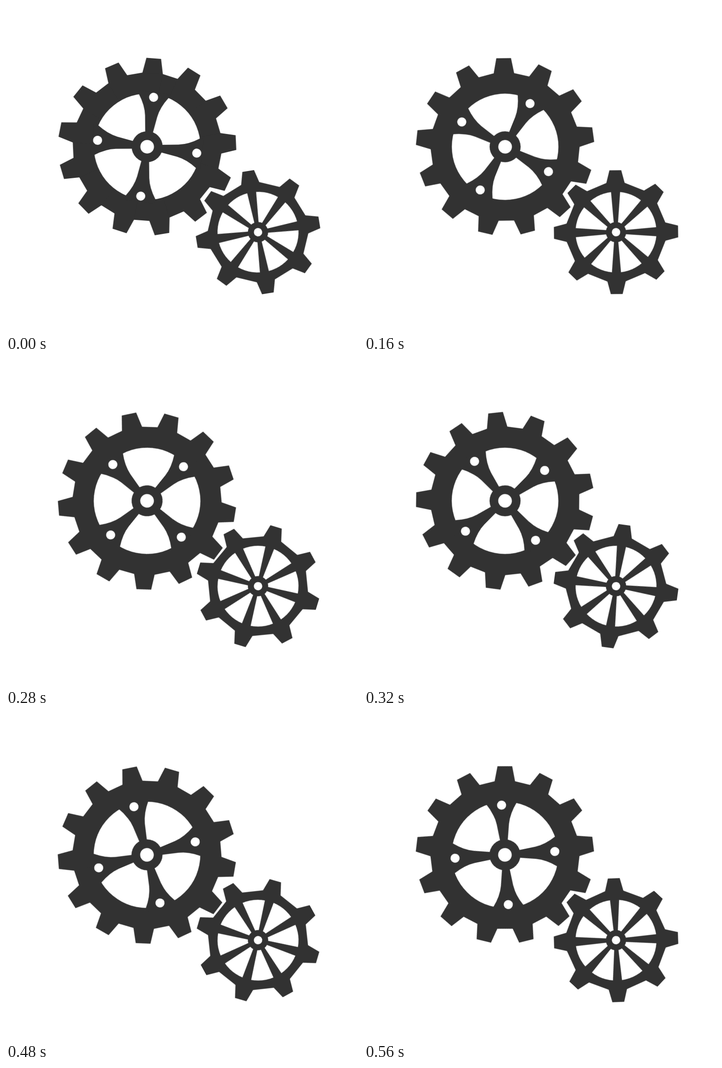
Animation, 776 px wide and 721 px high, one loop 0.6 s. Source, as an HTML page without scripts:

```html
<!DOCTYPE html>
<html lang="en">
<head>
<meta charset="utf-8">
<title>Turning gears</title>
<style>
  html, body { margin: 0; width: 100%; height: 100%; overflow: hidden; background: #fff; }
  svg { display: block; width: 776px; height: 721px; fill: #323232; }
  .hole { fill: #fff; }
  .spin { animation: spin .6s steps(15) infinite; }
  /* 15 steps each; the gear ratio is 13:8 */
  .large { --turn: 84.375deg; }
  .small { --turn: -137.11deg; }
  @keyframes spin {
    from { transform: rotate(0deg); }
    to { transform: rotate(var(--turn)); }
  }
</style>
</head>
<body>
<svg viewBox="0 0 776 721">
  <defs>
    <!-- Each tooth also covers the base of the next one, so no seams show -->
    <path id="big-tooth" d="M-22.6-162.7 L-16.2-196 H16.2 L22.6-162.7 L55.6-154.6 L95.6-133.6 L0 0Z"/>
    <path id="small-tooth" d="M-20.2-109 L-13-136.9 H13 L20.2-109 L62.8-91.35 L91.35-62.8 L0 0Z"/>
    <g id="big-spoke">
      <path d="M-8.2-30 L-13.5-68 Q-17-90 -33-113 V-122 H33 V-113 Q17-90 13.5-68 L8.2-30Z"/>
      <circle class="hole" cy="-110.2" r="10"/>
    </g>
    <path id="small-spoke" d="M-4.6-20 L-10-89 V-94 H10 V-89 L4.6-20Z"/>
  </defs>

  <g transform="translate(310.75 311.05)">
    <g class="spin large">
      <!-- The axle sits slightly off the pivot -->
      <g transform="translate(.45 .15)">
        <g transform="rotate(4.25)">
          <use href="#big-tooth"/>
          <use href="#big-tooth" transform="rotate(27.692)"/>
          <use href="#big-tooth" transform="rotate(55.385)"/>
          <use href="#big-tooth" transform="rotate(83.077)"/>
          <use href="#big-tooth" transform="rotate(110.769)"/>
          <use href="#big-tooth" transform="rotate(138.462)"/>
          <use href="#big-tooth" transform="rotate(166.154)"/>
          <use href="#big-tooth" transform="rotate(193.846)"/>
          <use href="#big-tooth" transform="rotate(221.538)"/>
          <use href="#big-tooth" transform="rotate(249.231)"/>
          <use href="#big-tooth" transform="rotate(276.923)"/>
          <use href="#big-tooth" transform="rotate(304.615)"/>
          <use href="#big-tooth" transform="rotate(332.308)"/>
        </g>
        <circle class="hole" r="117.5"/>
        <g transform="rotate(7.4)">
          <use href="#big-spoke"/>
          <use href="#big-spoke" transform="rotate(90)"/>
          <use href="#big-spoke" transform="rotate(180)"/>
          <use href="#big-spoke" transform="rotate(270)"/>
        </g>
        <circle r="34.2"/>
        <circle class="hole" r="15"/>
      </g>
    </g>
  </g>

  <g transform="translate(555.6 500.2)">
    <g class="spin small">
      <g transform="rotate(-9.1)">
        <use href="#small-tooth"/>
        <use href="#small-tooth" transform="rotate(45)"/>
        <use href="#small-tooth" transform="rotate(90)"/>
        <use href="#small-tooth" transform="rotate(135)"/>
        <use href="#small-tooth" transform="rotate(180)"/>
        <use href="#small-tooth" transform="rotate(225)"/>
        <use href="#small-tooth" transform="rotate(270)"/>
        <use href="#small-tooth" transform="rotate(315)"/>
        <circle class="hole" r="89.3"/>
        <use href="#small-spoke"/>
        <use href="#small-spoke" transform="rotate(45)"/>
        <use href="#small-spoke" transform="rotate(90)"/>
        <use href="#small-spoke" transform="rotate(135)"/>
        <use href="#small-spoke" transform="rotate(180)"/>
        <use href="#small-spoke" transform="rotate(225)"/>
        <use href="#small-spoke" transform="rotate(270)"/>
        <use href="#small-spoke" transform="rotate(315)"/>
        <circle r="22.4"/>
        <circle class="hole" r="9.2"/>
      </g>
    </g>
  </g>
</svg>
</body>
</html>
```
